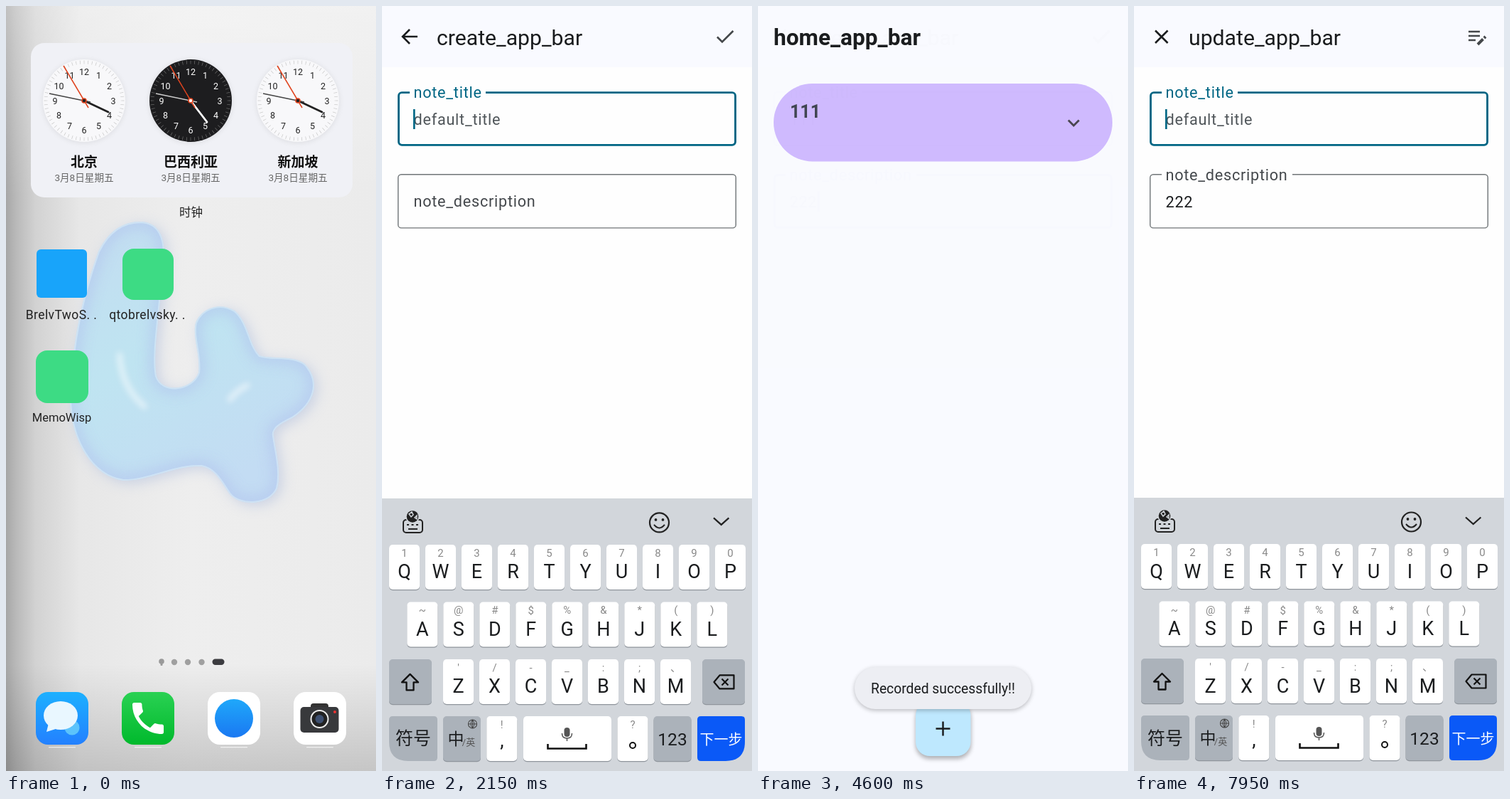
Write an HTML page that moves like this. It is 521 by 1075 pixels and loops after 8000 ms.

```html
<!DOCTYPE html>
<html lang="zh-CN">
<head>
<meta charset="utf-8">
<style>
html, body { margin: 0; width: 100%; height: 100%; overflow: hidden; background: #f9faff; }
svg { display: block; width: 521px; height: 1075px; }
text { font-family: Roboto, "Noto Sans CJK SC", "Noto Sans CJK", sans-serif; white-space: pre; }
</style>
</head>
<body>
<svg id="stage" viewBox="0 0 521 1075"></svg>
<script>
const $ = id => document.getElementById(id);
const INK = '#1a1c1e', BAR = '#f9faff';

// markup helpers
const rect = (x, y, w, h, r, fill, more = '') =>
  `<rect x="${x}" y="${y}" width="${w}" height="${h}" rx="${r}" fill="${fill}" ${more}/>`;
const circle = (x, y, r, fill, more = '') => `<circle cx="${x}" cy="${y}" r="${r}" fill="${fill}" ${more}/>`;
const text = (x, y, s, size, fill = INK, more = '') =>
  `<text x="${x}" y="${y}" font-size="${size}" fill="${fill}" ${more}>${s}</text>`;
const mid = (x, y, s, size, fill, more = '') => text(x, y, s, size, fill, 'text-anchor="middle" ' + more);
const line = (d, color = INK, w = 2.6, more = '') =>
  `<path d="${d}" fill="none" stroke="${color}" stroke-width="${w}" ${more}/>`;
const group = (id, body, more = '') => `<g id="${id}" ${more}>${body}</g>`;
const gradient = (id, dir, ...stops) => `<linearGradient id="${id}" x1="0" y1="0" ${dir}>` +
  stops.map(([o, c, a = 1]) => `<stop offset="${o}" stop-color="${c}" stop-opacity="${a}"/>`).join('') +
  '</linearGradient>';
const blur = (id, s) =>
  `<filter id="${id}" x="-40%" y="-40%" width="180%" height="180%"><feGaussianBlur stdDeviation="${s}"/></filter>`;

const balloon = 'M190 303C215 304 226 325 222 360C217 430 206 490 212 520C220 545 262 540 271 515' +
  'C274 490 262 465 267 445C275 425 300 415 322 428C342 445 342 475 357 491C375 497 405 490 421 503' +
  'C446 530 432 560 405 578C390 586 375 592 377 604C380 625 388 655 382 678C372 702 330 704 315 686' +
  'C305 672 295 650 275 647C240 645 200 668 165 667C120 660 92 610 90 555C92 470 110 400 130 345' +
  'C145 315 165 303 190 303Z';

const defs = '<defs>' +
  gradient('wall', 'x2="1" y2="0"', [0, '#a6a6a6'], [.025, '#b8b8b8'], [.08, '#d2d2d2'], [.2, '#e7e7e7'], [.5, '#eeeeee'], [1, '#ebebeb']) +
  gradient('shade', 'x2="0" y2="1"', [0, '#fff', .3], [.25, '#fff', 0], [.86, '#000', 0], [1, '#000', .16]) +
  gradient('skin', 'x2=".5" y2="1"', [0, '#c3dcf1'], [.5, '#bfe4f1'], [1, '#c3dcf3']) +
  gradient('chat', 'x2="0" y2="1"', [0, '#1cb0ff'], [1, '#2380ff']) +
  gradient('call', 'x2="0" y2="1"', [0, '#2ad153'], [1, '#00b92c']) +
  gradient('net', 'x2="0" y2="1"', [0, '#1fa8fa'], [1, '#1a78f2']) +
  blur('soft', 9) + blur('glow', 4) + blur('drop', 3) +
  `<clipPath id="inside"><path d="${balloon}"/></clipPath>` +
  '<clipPath id="window"><rect id="frame" width="521"/></clipPath></defs>';

// launcher
function clock(cx, dark, hx, hy, city) {
  const ink = dark ? '#fff' : '#222';
  let s = circle(cx, 134, 59, '#888', 'filter="url(#drop)" opacity=".16"') +
    circle(cx, 133, 58, dark ? '#1d1d1f' : '#f8f8fa') +
    circle(cx, 133, 54, 'none', `stroke="${dark ? '#666' : '#ccc'}" stroke-width="5" pathLength="60" stroke-dasharray=".14 .86" stroke-dashoffset=".07"`);
  for (let i = 1; i < 13; i++) {
    const a = i * Math.PI / 6;
    s += mid(cx + 41 * Math.sin(a), 137.5 - 41 * Math.cos(a), i, 12.5, ink);
  }
  return s + line(`M${cx} 133l${hx} ${hy}`, ink, 2.8, 'stroke-linecap="round"') +
    line(`M${cx + 9} 135l-58 -12`, dark ? '#ccc' : '#444', 1.5) +
    line(`M${cx + 6} 143l-35 -59`, '#e0441f', 1.5) +
    circle(cx, 133, 3, ink, 'stroke="#e0441f" stroke-width="1.6"') +
    mid(cx, 226, city, 19, '#111', 'font-weight="700"') +
    mid(cx, 245.5, '3月8日星期五', 13.6, '#666');
}
const handset = 'M6.6 10.8c1.4 2.8 3.8 5.1 6.6 6.6l2.2-2.2c.3-.3.7-.4 1-.2 1.1.4 2.3.5 3.6.5.6 0 1 .5 1 1V20' +
  'c0 .6-.4 1-1 1C10.6 21 3 13.4 3 4c0-.6.5-1 1-1h3.5c.6 0 1 .5 1 1 0 1.3.2 2.5.6 3.6.1.4 0 .7-.3 1z';
const wallpaper = rect(0, 0, 521, 1075, 0, 'url(#wall)') + rect(0, 0, 521, 1075, 0, 'url(#shade)') +
  `<path d="${balloon}" fill="#a9b9dc" opacity=".5" filter="url(#soft)" transform="translate(5 4)"/>` +
  `<g clip-path="url(#inside)"><path d="${balloon}" fill="url(#skin)"/>` +
  line(balloon, '#b3c6ee', 18, 'filter="url(#soft)" opacity=".7"') +
  line(balloon, '#dceff7', 4, 'opacity=".6"') +
  line('M160 490Q162 535 195 563M315 553Q325 540 340 533', '#fff', 7, 'filter="url(#glow)" opacity=".6" stroke-linecap="round"') + '</g>';
const icons = rect(35, 52, 453, 217, 19, '#f0f1f6') +
  clock(110, 0, 34, 16, '北京') + clock(260, 1, 23, 30, '巴西利亚') + clock(411, 0, 34, 16, '新加坡') +
  mid(260.5, 296, '时钟', 16.5, '#222') +
  rect(43, 342, 71, 68, 6, '#18a4fa') + rect(164, 341, 72, 72, 16, '#3ddb84') + rect(42, 484, 74, 74, 16, '#3ddb84') +
  mid(78, 440, 'BrelvTwoS. .', 17.5, '#222', 'letter-spacing=".4"') +
  mid(199, 440, 'qtobrelvsky. .', 17.5, '#222', 'letter-spacing=".4"') +
  mid(78.5, 584, 'MemoWisp', 16.5, '#222') +
  circle(219, 921, 3.8, '#999') + rect(217.5, 924, 3, 3, 1, '#999') +
  [237, 256, 275.5].map(x => circle(x, 922, 4.2, '#a0a0a0')).join('') + rect(290.5, 917.5, 17, 8.5, 4.2, '#3c3c40') +
  ['url(#chat)', 'url(#call)', '#fff', '#fff'].map((c, i) => rect(42 + i * 121, 964, 74, 74, 17, c) +
    rect(60 + i * 121, 1041, 38, 1.3, .6, '#fff', 'opacity=".7"')).join('') +
  circle(93, 1014, 10.5, '#5cc3fb') + '<ellipse cx="77" cy="997" rx="24" ry="20" fill="#e9f7ff"/>' +
  '<path d="M60 1008l-3 12l16 -5z" fill="#e9f7ff"/>' +
  `<path d="${handset}" fill="#fff" transform="translate(170.6 971.6) scale(2.45)"/>` +
  circle(321, 1001, 27, 'url(#net)') +
  rect(429, 980, 25, 12, 4, '#333') + rect(414.5, 985, 54, 36, 5, '#38393c') +
  circle(441.5, 1002, 13, '#eee') + circle(441.5, 1002, 11, '#222') + circle(441.5, 1002, 6, '#3d4f70') +
  circle(463, 992, 2, '#e33');

// app screens
const home = rect(0, 0, 521, 1075, 0, BAR) + text(22, 55, 'home_app_bar', 31.6, INK, 'font-weight="700"') +
  group('card', rect(22, 109, 477, 109.5, 54.7, '#cfbafe') +
    text(45, 157, '111', 25, '#3f4450', 'font-weight="700"') + line('M437 160.5l7.5 7.5l7.5 -7.5', '#48454e', 2.8) +
    rect(22, 109, 477, 109.5, 54.7, '#000', 'id="cardTap"')) +
  rect(222, 981, 78, 77, 20, '#000', 'filter="url(#drop)" opacity=".3"') +
  rect(222, 977, 77.5, 77, 20, '#bee8fe') + line('M250.5 1015.5h20M260.5 1005.5v20', INK, 2.5) +
  rect(222, 977, 77.5, 77, 20, '#000', 'id="fabTap"');

const field = (id, y, label, gap) => rect(0, 0, 0, 0, 4.5, 'none', `id="${id}Box"`) +
  rect(39, y - 3, gap, 6, 0, '#fff', `id="${id}Gap"`) +
  text(44.5, 0, label, 21.7, INK, `id="${id}Label" letter-spacing=".72"`) +
  text(44.5, y + 46, '', 21.7, INK, `id="${id}Text" letter-spacing=".72"`) +
  rect(0, y + 24, 2.6, 28, 0, '#006684', `id="${id}Caret"`);
const form = (id, title, tools) => rect(0, 0, 521, 1075, 0, '#fefefe') + rect(0, 0, 521, 86, 0, BAR) +
  text(77, 54.5, title, 30.2) + tools +
  field(id + 1, 121, 'note_title', 107) + field(id + 2, 236.8, 'note_description', 184);
const create = form('c', 'create_app_bar', line('M50 43H30M39 33L29 43L39 53') +
  circle(483, 42.5, 27, '#000', 'id="checkTap"') + line('M472 43.5l7 7l15.5 -15.5', '#44474a'));
const update = form('u', 'update_app_bar', line('M30 34.5l17.5 17.5M47.5 34.5L30 52') +
  line('M471 36h16M471 42h16M471 48h10', '#44474a', 2.4) + line('M484 54l7.5 -7.5M493 45l2 -2', '#44474a', 4));

// keyboard
const GREY = '#abb2ba', BLUE = '#0a59f7';
const key = (x, y, w, h, fill = '#fff') => rect(x, y + 1.2, w, h, 5, '#8f959c') + rect(x, y, w, h, 5, fill);
const corner = (x, y, w, h, fill, right) => `<path fill="${fill}" d="M${x + 5} ${y}h${w - 10}q5 0 5 5v` +
  (right ? `${h - 32}q0 27 -27 27h${32 - w}q-5 0 -5 -5v${10 - h}` : `${h - 10}q0 5 -5 5h${32 - w}q-27 0 -27 -27v${32 - h}`) + 'q0 -5 5 -5z"/>';
const space = (x, y) => line(`M${x - 27} ${y}v6.5h54v-6.5`, '#111', 2.6) +
  rect(x - 4, y - 23, 8, 13, 4, '#555') + line(`M${x - 7} ${y - 15}q0 7 7 7t7 -7M${x} ${y - 8}v4`, '#555', 1.5);
const erase = (x, y) => line(`M${x - 14} ${y}l8 -9.5h20v19h-20zM${x - 3} ${y - 4.5}l9 9m0 -9l-9 9`, '#111', 2.2, 'stroke-linejoin="round"');

const tools = rect(0, 691, 521, 384, 0, '#d2d6db') +
  rect(30, 721, 27, 18, 4, 'none', 'stroke="#222" stroke-width="2"') + circle(43, 716.5, 10, '#d2d6db') + circle(43, 716.5, 8.3, '#222') +
  line('M38 713l4 -3l2 4l-3 3zM46 718l3 -3v5z', '#d2d6db', 1.5) +
  line('M35 728h16', '#222', 2, 'stroke-dasharray="3 3.5"') + line('M37 734h13', '#222', 2) +
  circle(390.5, 725, 13.5, 'none', 'stroke="#222" stroke-width="2.2"') + circle(385.5, 721, 1.9, '#222') + circle(395.5, 721, 1.9, '#222') +
  line('M383 728q7.5 9 15 0', '#222', 2) + line('M467 718.5l10.7 9.5l10.7 -9.5', '#222', 2.2);

const rows = [754, 834, 913.5, 993];
const digits = key(10, 754, 79.5, 232) + ['+', '−', '=', '/'].map((c, i) => mid(50, 790 + i * 58.3, c, 23)).join('') +
  [...'123456789'].map((c, i) => {
    const x = 98 + i % 3 * 111.3, y = rows[i / 3 | 0];
    return key(x, y, 103, 73) + mid(x + 51.5, y + 45.5, c, 25);
  }).join('') +
  rows.slice(0, 3).map(y => key(432, y, 79, 73, GREY)).join('') + erase(472, 791) +
  mid(471.5, 880, '@', 27) + mid(471.5, 962, '.', 25) +
  corner(10, 993, 79.5, 73, GREY) + mid(49.5, 1038.5, '符号', 25) + key(98, 993, 103, 73) + space(149.5, 1037) +
  key(209.3, 993, 103, 73) + mid(261, 1038.5, '0', 25) + key(320.6, 993, 103, 73, GREY) + mid(372.5, 1038.5, '返回', 25) +
  corner(432, 993, 79, 73, BLUE, 1) + mid(471.5, 1038.5, '下一步', 24, '#fff');

const letterRow = (x0, y, letters, hints) => [...letters].map((c, i) => {
  const x = x0 + i * 51;
  return key(x, y, 43, 63) + mid(x + 21.5, y + 17, hints[i], 15, '#888') + mid(x + 21.5, y + 47.5, c, 27);
}).join('');
const letters = letterRow(10, 756, 'QWERTYUIOP', '1234567890') + letterRow(35.3, 836.5, 'ASDFGHJKL', ['~', '@', '#', '$', '%', '&amp;', '*', '(', ')']) +
  letterRow(86, 917, 'ZXCVBNM', "'/-_:;、") + key(10, 917, 60, 63, GREY) + key(451, 917, 60, 63, GREY) + erase(481.5, 949) +
  line('M39.5 938l11.5 11.5h-6.5v11h-10v-11H28z', '#111', 2.3, 'stroke-linejoin="round"') +
  corner(10, 997, 68, 63, GREY) + mid(44, 1037.5, '符号', 25) + key(86, 997, 53, 63, GREY) + mid(104, 1037, '中', 23) +
  mid(122, 1038, '/英', 13, '#555') + circle(127.5, 1008, 6, 'none', 'stroke="#444" stroke-width="1.1"') +
  line('M121.5 1008h12M127.5 1002v12M127.5 1002q-5 6 0 12q5 -6 0 -12', '#444', 1) +
  key(147.3, 997, 43, 63) + mid(168.8, 1014, '!', 15, '#888') + mid(168.8, 1040, ',', 27) +
  key(199, 997, 124, 63) + space(260.5, 1036) + key(331.5, 997, 43, 63) + mid(353, 1014, '?', 15, '#888') +
  circle(353, 1038, 4, 'none', 'stroke="#111" stroke-width="2"') +
  key(382.5, 997, 53, 63, GREY) + mid(409, 1038, '123', 24.5) +
  corner(444, 997, 67, 63, BLUE, 1) + mid(477.5, 1037, '下一步', 20, '#fff');

$('stage').innerHTML = defs + group('launcher', wallpaper + group('icons', icons)) +
  group('app', rect(0, 0, 521, 1075, 0, BAR) + group('home', home) + group('create', create) + group('update', update) +
    rect(0, 0, 521, 521, 110, '#3ddb84', 'id="splash"'), 'clip-path="url(#window)"') +
  group('keyboard', tools + group('digits', digits) + group('letters', letters) + rect(0, 0, 0, 0, 5, '#000', 'id="press" opacity=".14"')) +
  group('toast', rect(136, 931, 249, 59, 29.5, '#000', 'filter="url(#drop)" opacity=".25"') +
    rect(136, 929, 249, 59, 29.5, '#edeef3') + mid(260.5, 966, 'Recorded successfully!!', 19.3));

// motion
const ramp = (t, a, b) => Math.min(1, Math.max(0, (t - a) / (b - a)));
const pulse = (t, a, b) => ramp(t, a - 50, a + 50) * (1 - ramp(t, b, b + 150));
const lerp = (a, b, p) => a + (b - a) * p;
function ease(x) { // cubic-bezier(.4, 0, .2, 1)
  let lo = 0, hi = 1, u = x;
  for (let i = 0; i < 20; i++) {
    u = (lo + hi) / 2;
    if (1.2 * (1 - u) ** 2 * u + .6 * (1 - u) * u * u + u ** 3 < x) lo = u; else hi = u;
  }
  return 3 * (1 - u) * u * u + u ** 3;
}
const move = (t, a, b) => ease(ramp(t, a, b));
const set = (id, attrs) => { for (const k in attrs) $(id).setAttribute(k, attrs[k]); };
const show = (id, a) => set(id, { opacity: a, display: a > 0 ? 'inline' : 'none' });
const blend = (a, b, p) => `rgb(${a.map((v, i) => Math.round(lerp(v, b[i], p)))})`;
const count = (t, times) => times.filter(v => t >= v).length;

function setField(id, y, focus, lift, value, hint = '') {
  const w = lerp(1.4, 2.9, Math.sqrt(focus)); // the outer edge stays put
  set(id + 'Box', { x: 22 + w / 2, y: y - .8 + w / 2, width: 477 - w, height: 76.6 - w,
    stroke: blend([112, 117, 120], [0, 102, 132], focus), 'stroke-width': w });
  set(id + 'Label', { y: lerp(y + 45, y + 7.8, lift), fill: blend([68, 72, 76], [0, 102, 132], focus) });
  show(id + 'Gap', lift > .8 ? 1 : 0);
  $(id + 'Text').textContent = value || hint;
  set(id + 'Text', { fill: value ? INK : '#50565a', opacity: value ? 1 : ramp(lift, .7, 1) });
  set(id + 'Caret', { x: 44 + value.length * 13.2 });
  show(id + 'Caret', focus > .3 ? 1 : 0);
}

const ones = [2500, 2600, 2700], twos = [3200, 3350, 3500], cuts = [7600, 7750, 7850];
const presses = [[2300, 2350, 382.5, 997, 53, 63], [2950, 3000, 432, 993, 79, 73],
  ...ones.map(t => [t, t + 50, 98, 754, 103, 73]), ...twos.map(t => [t, t + 50, 209.3, 754, 103, 73]),
  ...cuts.map(t => [t, t + 100, 451, 917, 60, 63])];

function draw(t) {
  // launch: the icon grows into the window
  const open = move(t, 100, 600), w = lerp(74, 521, open), h = lerp(74, 1075, open), k = w / 521;
  show('launcher', open < 1 ? 1 : 0);
  set('icons', { opacity: 1 - open, transform: `translate(260 537) scale(${1 - open * .1}) translate(-260 -537)` });
  show('app', t >= 100 ? 1 : 0);
  set('app', { transform: `translate(${lerp(42, 0, open)} ${lerp(484, 0, open)}) scale(${k})` });
  set('frame', { height: h / k, rx: lerp(16, 0, open ** 3) / k });
  show('splash', 1 - ramp(open, 0, .5));

  // screens cross-fade
  const toCreate = move(t, 1030, 1730), toHome = move(t, 4000, 4650), toUpdate = move(t, 6270, 6970);
  show('home', t < 4000 ? 1 - toCreate : toHome * (1 - toUpdate));
  show('create', toCreate * (1 - toHome));
  show('update', toUpdate);
  show('card', t > 3000 ? 1 : 0);
  show('fabTap', .1 * pulse(t, 1000, 1200));
  show('cardTap', .1 * pulse(t, 6250, 6450));
  show('checkTap', .065 * pulse(t, 3700, 4150));

  // fields
  const lift1 = move(t, 1800, 1950), lift2 = move(t, 3000, 3150), edit = move(t, 7100, 7250);
  setField('c1', 121, lift1 * (1 - lift2), lift1, '1'.repeat(count(t, ones)), 'default_title');
  setField('c2', 236.8, lift2, lift2, '2'.repeat(count(t, twos)));
  setField('u1', 121, edit, 1, '1'.repeat(3 - count(t, cuts)), 'default_title');
  setField('u2', 236.8, 0, 1, '222');

  // keyboard
  const up = move(t, 1870, 2170) - move(t, 4120, 4420) + move(t, 7150, 7450);
  show('keyboard', up > 0 ? 1 : 0);
  set('keyboard', { transform: `translate(0 ${(1 - up) * 384})` });
  const numeric = t >= 2350 && t < 5000;
  show('digits', numeric ? 1 : 0);
  show('letters', numeric ? 0 : 1);
  const [, , x, y, width, height] = presses.find(p => t >= p[0] && t < p[1]) || [0, 0, 0, 0, 0, 0];
  set('press', { x, y, width, height });

  // toast
  const rise = move(t, 3830, 4050), leave = ramp(t, 5900, 5960);
  show('toast', rise * (1 - leave));
  set('toast', { transform: `translate(0 ${(1 - rise) * 20 + leave * 7})` });
}

const start = performance.now();
function tick() {
  const t = (performance.now() - start) % 8000;
  draw(Math.floor(t / 50) * 50);
  requestAnimationFrame(tick);
}
draw(0);
requestAnimationFrame(tick);
</script>
</body>
</html>
```
